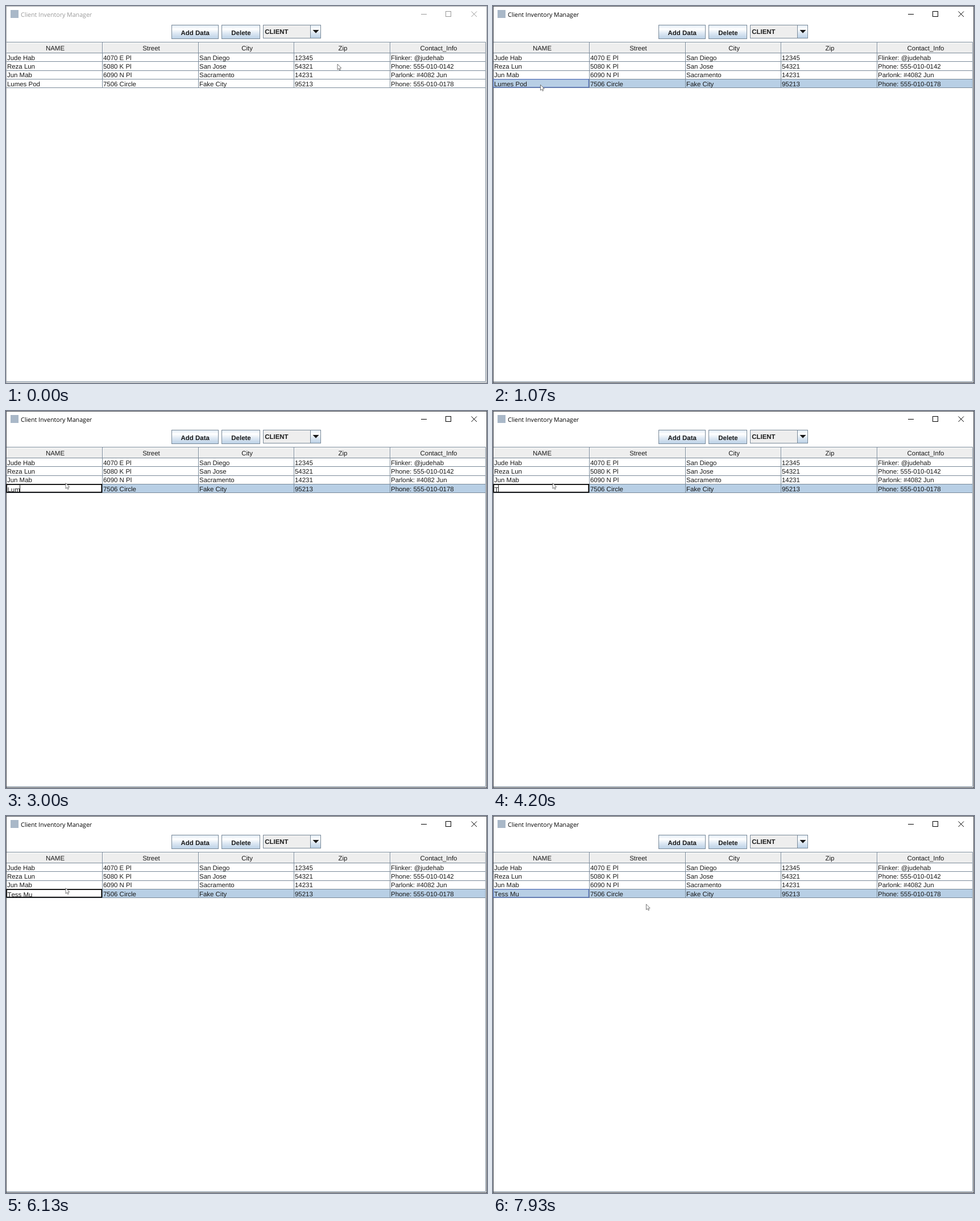
Animation of 846 by 662 pixels, one loop 8000 ms. Source, as an HTML page with a canvas:

```html
<!DOCTYPE html>
<html lang="en">
<head>
<meta charset="utf-8">
<title>Client Inventory Manager</title>
<style>
  html, body { margin: 0; width: 100%; height: 100%; overflow: hidden; background: #fff; }
  canvas { display: block; width: 846px; height: 662px; }
</style>
</head>
<body>
<canvas id="stage" width="846" height="662"></canvas>
<script>
const ctx = document.getElementById('stage').getContext('2d');
const LOOP = 8000, FPS = 15;
const SANS = '"Liberation Sans", Arial, sans-serif';
const CELL = `11.45px ${SANS}`;
const BOLD = `bold 11.45px ${SANS}`;
const TITLE = '10.65px "Open Sans", "Noto Sans", sans-serif';
const GRID = '#7a8a99', SELECTED = '#b8cfe5', PANEL = '#eeeeee', INK = '#1a1a1a';

const ACTIVATE = 1070, EDIT = 1200, SELECT_WORD = 1400, COMMIT = 7330;
const BLINK = 470;
const FIRST = 'Lumes ', OLD_NAME = FIRST + 'Pod', NEW_NAME = 'Tess Mu';

const headers = ['NAME', 'Street', 'City', 'Zip', 'Contact_Info'];
const rows = [
  ['Jude Hab', '4070 E Pl', 'San Diego', '12345', 'Flinker: @judehab'],
  ['Reza Lun', '5080 K Pl', 'San Jose', '54321', 'Phone: 555-010-0142'],
  ['Jun Mab', '6090 N Pl', 'Sacramento', '14231', 'Parlonk: #4082 Jun'],
  ['', '7506 Circle', 'Fake City', '95213', 'Phone: 555-010-0178'],
];
const colX = i => Math.ceil(168.6 * i);
const rowY = i => Math.round(82 + 15.28 * i);

// Each key press leaves a text in the editor
const keys = [
  { at: EDIT, str: OLD_NAME },
  { at: SELECT_WORD, str: OLD_NAME },
  { at: 2330, str: FIRST },
];
for (let i = 1; i <= FIRST.length; i++) {
  keys.push({ at: 2370 + 160 * i, str: FIRST.slice(0, -i) });
}
function type(at, step, chars) {
  for (const ch of chars) {
    keys.push({ at, str: keys[keys.length - 1].str + ch });
    at += step;
  }
}
type(4200, 0, 'T');
type(4730, 70, 'ess');
type(5200, 200, ' Mu');

// Pointer strokes: quadratic curves, each starting where the last one ended
const home = [583, 102];
const strokes = [
  { from: 0, to: 530, bend: [-95, 351], end: [83.5, 138.3] },
  { from: 1600, to: 1870, bend: [92, 131], end: [105, 126.5] },
  { from: 6530, to: 7000, bend: [190, 143], end: [237.3, 142.7] },
  { from: 7000, to: 7330, bend: [241, 185], end: [210, 209] },
  { from: 7470, to: 7930, bend: [240, 185], end: [280.4, 143.8] },
];

function pointerAt(t) {
  t = Math.floor(t * FPS / 1000) * 1000 / FPS;
  let start = home;
  for (const { from, to, bend, end } of strokes) {
    if (t < from) break;
    const u = Math.min(1, (t - from) / (to - from)), v = 1 - u;
    start = start.map((p, i) => v * v * p + 2 * u * v * bend[i] + u * u * end[i]);
  }
  return start;
}

function fill(color, x, y, w, h) {
  ctx.fillStyle = color;
  ctx.fillRect(x, y, w, h);
}

function frame(color, x, y, w, h, width = 1) {
  ctx.strokeStyle = color;
  ctx.lineWidth = width;
  ctx.strokeRect(x + width / 2, y + width / 2, w - width, h - width);
}

function text(str, x, y, font = CELL, color = INK, align = 'left') {
  ctx.font = font;
  ctx.fillStyle = color;
  ctx.textAlign = align;
  ctx.fillText(str, x, y);
}

function path(points, closed) {
  ctx.beginPath();
  points.forEach(([x, y]) => ctx.lineTo(x, y));
  if (closed) ctx.closePath();
}

function bevel(x, y, w, h) {
  const g = ctx.createLinearGradient(0, y, 0, y + h);
  g.addColorStop(0, '#dde8f3');
  g.addColorStop(0.3, '#ffffff');
  g.addColorStop(0.6, '#dde8f3');
  g.addColorStop(1, SELECTED);
  fill(g, x, y, w, h);
  frame(GRID, x, y, w, h);
}

function drawWindow(active) {
  fill('#fff', 0, 0, 846, 662);
  fill('#a9b8c8', 8, 7, 14, 14);
  const ink = active ? '#000' : '#999';
  text('Client Inventory Manager', 26, 19, TITLE, ink);
  fill(ink, 730, 14, 10, 1);
  frame(ink, 773, 9, 10, 10);
  ctx.strokeStyle = ink;
  ctx.lineWidth = 1;
  path([[818.5, 9.5], [828, 19]]);
  ctx.stroke();
  path([[828, 9.5], [818.5, 19]]);
  ctx.stroke();
}

function drawToolbar() {
  bevel(291, 33, 83, 25);
  text('Add Data', 332.7, 51, BOLD, INK, 'center');
  bevel(379, 33, 68, 25);
  text('Delete', 413.5, 51, BOLD, INK, 'center');
  fill(PANEL, 452, 33, 102, 24);
  frame(GRID, 452, 33, 102, 24);
  bevel(535, 33, 19, 24);
  text('CLIENT', 455.3, 49, BOLD);
  ctx.fillStyle = INK;
  path([[539.5, 42], [550.5, 42], [545, 47.8]], true);
  ctx.fill();
}

function drawHeader() {
  fill(PANEL, 0, 63, 844, 20);
  fill('#fff', 1, 64, 842, 1);
  headers.forEach((name, i) => {
    fill('#fff', colX(i) + 1, 64, 1, 18);
    text(name, (colX(i) + colX(i + 1)) / 2 + 2, 78, CELL, INK, 'center');
  });
}

function drawTable(active, name) {
  if (active) fill(SELECTED, 0, rowY(3), 843, 15);
  for (let i = 0; i <= rows.length; i++) fill(GRID, 0, rowY(i), 844, 1);
  for (let i = 1; i <= headers.length; i++) fill(GRID, colX(i), 63, 1, 81);
  rows.forEach((row, r) => row.forEach((value, c) => {
    text(value, colX(c) + 2, Math.round(94.9 + 15.28 * r));
  }));
  text(name, 2, 141);
}

function drawEditor(t) {
  const { at, str } = keys.findLast(key => key.at <= t);
  fill('#fff', 0, 128, 169, 15);
  ctx.save();
  ctx.beginPath();
  ctx.rect(2, 130, 165, 12);
  ctx.clip();
  ctx.font = CELL;
  const width = s => ctx.measureText(s).width;
  if (t >= SELECT_WORD && str === OLD_NAME) {
    fill(SELECTED, 2 + width(FIRST), 130, width(OLD_NAME) - width(FIRST) + 1, 12);
  }
  text(str, 2.5, 142);
  if ((t - at) % 1000 < BLINK) fill(INK, Math.round(2 + width(str)), 130, 1, 12);
  ctx.restore();
  frame('#000', 0.2, 128, 169, 15.6, 1.8);
}

function drawBorders(active) {
  frame(GRID, 0, 63, 844, 597);
  frame(active ? '#4a4d52' : '#a2a6aa', 0, 0, 846, 662);
}

function drawArrow(x, y) {
  const shape = [[0, 0], [0, 9.8], [2.2, 7.8], [3.7, 11], [5.2, 10.3], [3.8, 7.2], [6.7, 7]];
  path(shape.map(([dx, dy]) => [x + dx, y + dy]), true);
  ctx.fillStyle = '#fff';
  ctx.fill();
  ctx.strokeStyle = '#555';
  ctx.lineWidth = 0.8;
  ctx.stroke();
}

function drawBeam(x, y) {
  const left = Math.round(x), top = Math.round(y) - 7;
  fill(INK, left, top, 1, 14);
  for (const edge of [top, top + 13]) fill(INK, left - 2, edge, 5, 1);
}

function drawPointer(t, editing) {
  const [x, y] = pointerAt(t);
  const overEditor = editing && x < colX(1) && y > rowY(3) && y < rowY(4);
  (overEditor ? drawBeam : drawArrow)(x, y);
}

function draw(t) {
  const active = t >= ACTIVATE;
  const editing = t >= EDIT && t < COMMIT;
  drawWindow(active);
  drawToolbar();
  drawHeader();
  drawTable(active, t < EDIT ? OLD_NAME : editing ? '' : NEW_NAME);
  drawBorders(active);
  if (editing) drawEditor(t);
  else if (active) frame('#5873b8', 0, 128, 169, 15.4, 1.3);
  drawPointer(t, editing);
}

ctx.fontKerning = 'none';
ctx.textRendering = 'geometricPrecision';
const start = performance.now();
function tick() {
  draw((performance.now() - start) % LOOP);
  requestAnimationFrame(tick);
}
tick();
</script>
</body>
</html>
```
